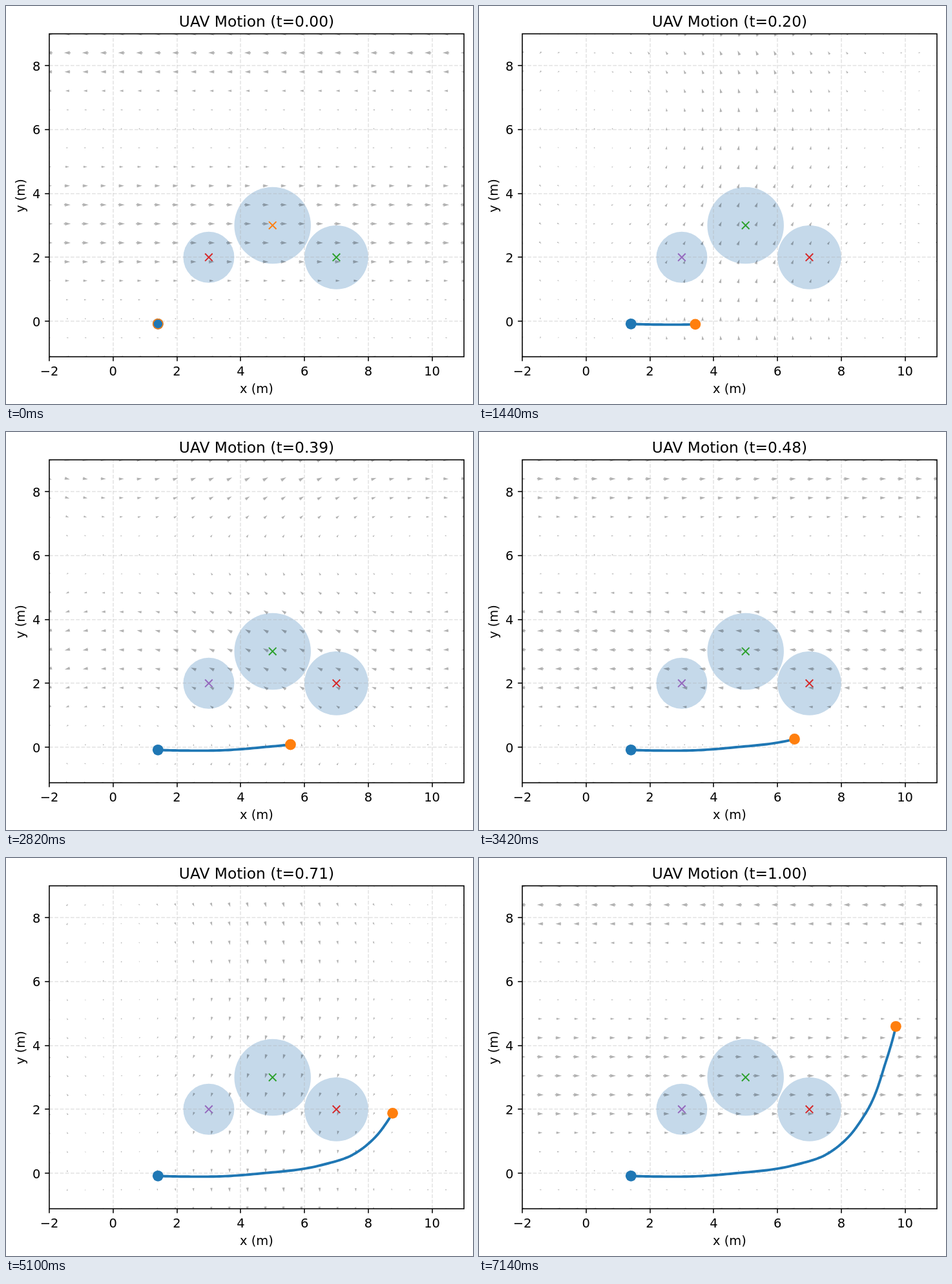
Animation, 723 px wide and 615 px high, one loop 7.2 s. Source, as an HTML page:

```html
<!DOCTYPE html>
<html lang="en">
<head>
<meta charset="utf-8">
<title>UAV Motion</title>
<style>
  html, body { margin: 0; width: 100%; height: 100%; overflow: hidden; background: #fff; }
  svg { display: block; }
  text { font-family: "DejaVu Sans", sans-serif; font-size: 19.44px; text-anchor: middle; }
</style>
</head>
<body>
<svg id="stage" width="723" height="615" viewBox="0 0 723 615">
  <clipPath id="axes"><rect x="67" y="43" width="642" height="499"/></clipPath>
</svg>
<script>
const STEPS = 120, STEP_MS = 60;
const BOX = { left: 67, right: 709, top: 43, bottom: 542 };
const BLUE = '#1f77b4', ORANGE = '#ff7f0e', GREEN = '#2ca02c', RED = '#d62728', PURPLE = '#9467bd';
const UNIT = 49.38;
const px = x => 165.8 + UNIT * x;
const py = y => 487.1 - UNIT * y;

const stage = document.getElementById('stage');
function add(tag, attrs, parent = stage) {
  const el = document.createElementNS('http://www.w3.org/2000/svg', tag);
  for (const key in attrs) el.setAttribute(key, attrs[key]);
  parent.appendChild(el);
  return el;
}
function label(content, x, y, attrs = {}) {
  const el = add('text', { x, y, ...attrs });
  el.textContent = content;
  return el;
}

// Plot area
const plot = add('g', { 'clip-path': 'url(#axes)' });
const obstacles = [
  { x: 5, y: 3, r: 1.2, first: ORANGE, later: GREEN },
  { x: 7, y: 2, r: 1, first: GREEN, later: RED },
  { x: 3, y: 2, r: 0.8, first: RED, later: PURPLE }
];
for (const o of obstacles)
  add('circle', { cx: px(o.x), cy: py(o.y), r: o.r * UNIT, fill: '#c5d9ea' }, plot);
const wind = add('path', { fill: '#000', 'fill-opacity': 0.3 }, plot);
const grid = add('g', { stroke: '#b0b0b0', 'stroke-opacity': 0.35, 'stroke-width': 1.56, 'stroke-dasharray': '5.76 2.49' }, plot);
const ticks = add('g', { stroke: '#000', 'stroke-width': 1.56 });

for (let v = -2; v <= 10; v += 2) {
  const x = Math.round(px(v));
  add('path', { d: `M${x} ${BOX.bottom}V${BOX.top}` }, grid);
  add('path', { d: `M${x} ${BOX.bottom}v6.8` }, ticks);
  label(String(v).replace('-', '\u2212'), px(v), 571);
}
for (let v = 0; v <= 8; v += 2) {
  const y = Math.round(py(v));
  add('path', { d: `M${BOX.left} ${y}H${BOX.right}` }, grid);
  add('path', { d: `M${BOX.left} ${y}h-6.8` }, ticks);
  label(v, 53.4, py(v) + 7.6, { style: 'text-anchor:end' });
}

const trail = add('path', { fill: 'none', stroke: BLUE, 'stroke-width': 3.9, 'stroke-linejoin': 'round', 'stroke-linecap': 'square' });
const start = add('circle', { fill: BLUE });
const drone = add('circle', { fill: ORANGE, r: 8.4 });
for (const o of obstacles)
  o.mark = add('path', {
    d: `M${px(o.x) - 5.8} ${py(o.y) - 5.8}l11.6 11.6m0 -11.6l-11.6 11.6`,
    'stroke-width': 1.94, fill: 'none'
  });

add('rect', {
  x: BOX.left, y: BOX.top, width: BOX.right - BOX.left, height: BOX.bottom - BOX.top,
  fill: 'none', stroke: '#000', 'stroke-width': 1.56
});
label('x (m)', 388, 598);
label('y (m)', 0, 0, { transform: 'translate(28.5 293) rotate(-90)' });
const title = label('', 388, 31.5, { style: 'font-size:23.33px' });

// Flight path: waypoints [t, x, y] joined by a cubic Hermite curve
const way = [
  [0, 235.3, 491.3], [0.1008, 282.3, 492.3], [0.2, 334, 491.9], [0.311, 393.5, 487.5],
  [0.479, 488.5, 474.5], [0.56, 535, 459.5], [0.64, 572, 431], [0.714, 598.5, 394.5],
  [0.882, 630.3, 313.5], [1, 645.4, 260.3]
];
const last = way.length - 1;
const span = i => way[i + 1][0] - way[i][0];
const rate = (i, c) => (way[i + 1][c] - way[i][c]) / span(i);
function tangent(i, c) {
  if (i === 0) return rate(0, c) + (rate(0, c) - rate(1, c)) * span(0) / (span(0) + span(1));
  const a = span(i - 1);
  if (i === last) return rate(i - 1, c) + (rate(i - 1, c) - rate(i - 2, c)) * a / (a + span(i - 2));
  const b = span(i);
  return (rate(i - 1, c) * b + rate(i, c) * a) / (a + b);
}
function position(t) {
  let i = 0;
  while (i < last - 1 && t > way[i + 1][0]) i++;
  const h = span(i), s = (t - way[i][0]) / h;
  return [1, 2].map(c =>
    (1 + 2 * s) * (1 - s) ** 2 * way[i][c] + s * (1 - s) ** 2 * h * tangent(i, c) +
    s * s * (3 - 2 * s) * way[i + 1][c] + s * s * (s - 1) * h * tangent(i + 1, c));
}
const track = Array.from({ length: STEPS }, (_, k) => position(k / (STEPS - 1)));

// Wind arrows, centred on each grid point
const COLS = 24, ROWS = 18, SHAFT = 1.85, REACH = 10.7;
function arrow(x, y, u, v) {
  const length = Math.hypot(u, v) * REACH / SHAFT;
  const tiny = length < 1;
  const scale = SHAFT * (tiny ? 1 : Math.min(1, length / 5));
  const n = Math.max(5, length), mid = n / 2;
  const outline = tiny
    ? [0, 1, 2, 3, 4, 5].map(k => [Math.cos(k * Math.PI / 3) / 2, Math.sin(k * Math.PI / 3) / 2])
    : [[0, 0.5], [n - 4.5, 0.5], [n - 5, 1.5], [n, 0], [n - 5, -1.5], [n - 4.5, -0.5], [0, -0.5]]
        .map(([a, b]) => [a - mid, b]);
  const angle = Math.atan2(-v, u), c = Math.cos(angle) * scale, s = Math.sin(angle) * scale;
  return 'M' + outline.map(([a, b]) =>
    `${(x + a * c - b * s).toFixed(2)} ${(y + a * s + b * c).toFixed(2)}`).join('L') + 'Z';
}
function windPath(t) {
  const cos = Math.cos(2 * Math.PI * t), sin = Math.sin(2 * Math.PI * t);
  let d = '';
  for (let r = 0; r < ROWS; r++) {
    const y = BOX.top + r * (BOX.bottom - BOX.top) / (ROWS - 1);
    const u = cos * Math.sin(Math.PI * (py(0) - y) / UNIT / 6);
    for (let c = 0; c < COLS; c++) {
      const x = BOX.left + c * (BOX.right - BOX.left) / (COLS - 1);
      d += arrow(x, y, u, 0.7 * sin * Math.sin(Math.PI * (x - px(0)) / UNIT / 10));
    }
  }
  return d;
}

function draw(k) {
  const t = k / (STEPS - 1), first = k === 0;
  title.textContent = `UAV Motion (t=${t.toFixed(2)})`;
  wind.setAttribute('d', windPath(t));
  trail.setAttribute('d', first ? '' : 'M' + track.slice(0, k + 1).map(p => p.join(' ')).join('L'));
  for (const [dot, p] of [[start, track[0]], [drone, track[k]]]) {
    dot.setAttribute('cx', p[0]);
    dot.setAttribute('cy', p[1]);
  }
  // At rest the two dots coincide and show as blue with an orange rim
  start.setAttribute('r', 8.4);
  drone.setAttribute('r', first ? 7.6 : 8.4);
  drone.setAttribute('fill', first ? BLUE : ORANGE);
  drone.setAttribute('stroke', first ? ORANGE : 'none');
  drone.setAttribute('stroke-width', 1.6);
  for (const o of obstacles) o.mark.setAttribute('stroke', first ? o.first : o.later);
}

let shown = -1;
function tick() {
  const k = Math.floor(performance.now() / STEP_MS) % STEPS;
  if (k !== shown) draw(shown = k);
  requestAnimationFrame(tick);
}
tick();
</script>
</body>
</html>
```
